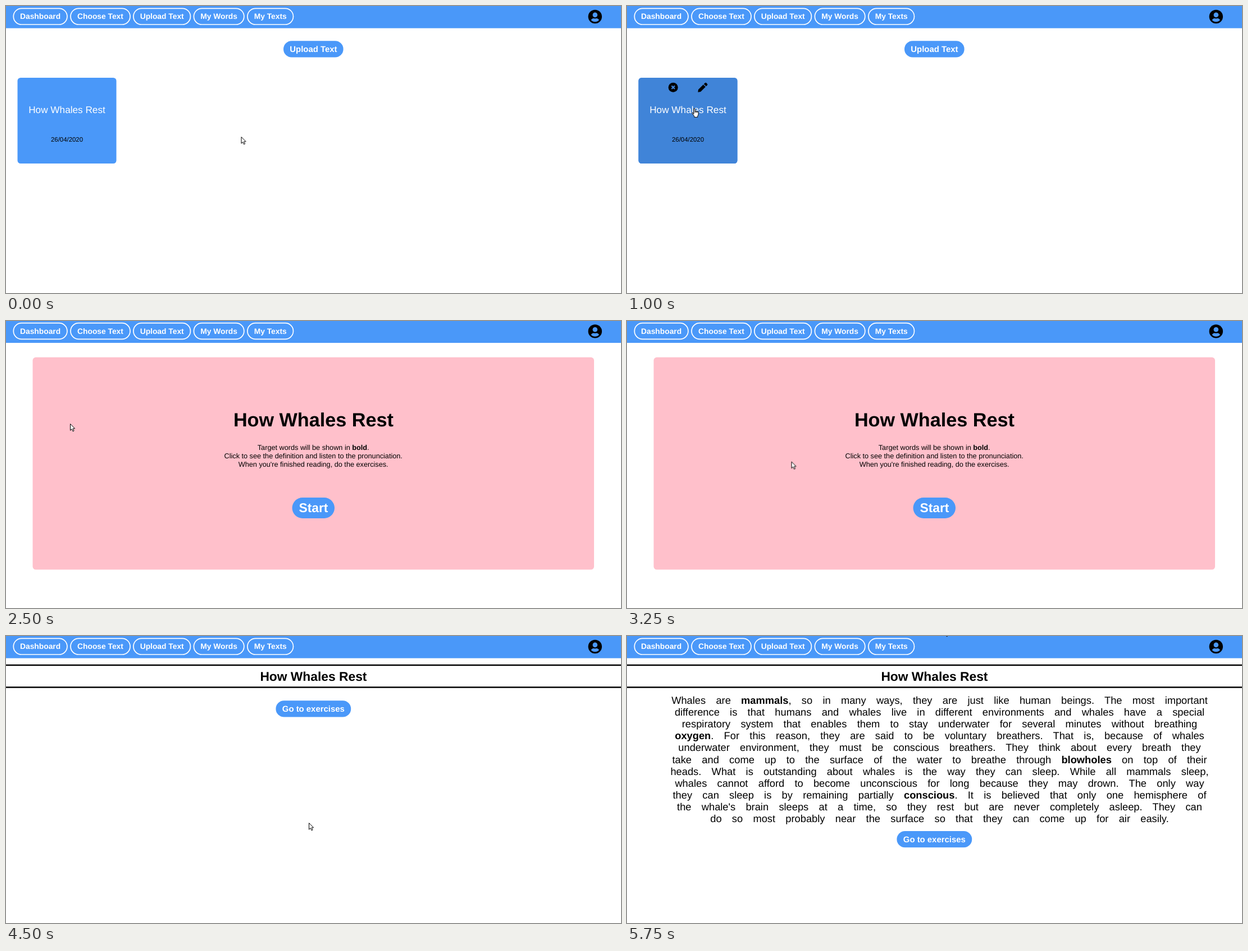
These frames come from a looping animation (1095x512 px, 6.25 s). An HTML page:

```html
<!DOCTYPE html>
<html lang="en">
<head>
<meta charset="utf-8">
<title>Reading app</title>
<style>
  html, body { margin: 0; width: 100%; height: 100%; overflow: hidden; background: #fff; }
  svg { display: block; width: 100vw; height: 100vh; --blue: #4a98f9; }
  text {
    font-family: "Liberation Sans", Arial, sans-serif;
    text-anchor: middle;
    text-rendering: geometricPrecision;
    white-space: pre;
  }
  .blue { fill: var(--blue); }
  .bold { font-weight: 700; }
  .nav text { font-size: 13.8px; font-weight: 700; fill: #fff; }
  .nav .pill { fill: none; stroke: #fff; stroke-width: 1.7; }
  .btn text { font-size: 14.9px; font-weight: 700; fill: #fff; }
  .intro { font-size: 12.7px; }
  .story text { font-size: 18.3px; word-spacing: 13.2px; }
  .pointer path { fill: #fff; stroke: #000; stroke-width: 1; stroke-linejoin: round; }

  /* one percent step of 4 equals 250 ms */
  .list, .start, .read, .card-on, .start-on, .story, .arrow, .hand, .pointer, .go, .nav {
    animation: 6250ms step-end infinite;
  }
  .list { animation-name: list; }
  .start { animation-name: start; }
  .read { animation-name: read; }
  .card-on { animation-name: card-on; }
  .start-on { animation-name: start-on; }
  .story { animation-name: story; }
  .arrow { animation-name: arrow; }
  .hand { animation-name: hand; }
  .pointer { animation-name: move; }
  .go { animation-name: go; }
  .nav { animation-name: nav; }

  @keyframes list { 0% { visibility: visible } 40%, 100% { visibility: hidden } }
  @keyframes start { 0% { visibility: hidden } 40% { visibility: visible } 72%, 100% { visibility: hidden } }
  @keyframes read { 0% { visibility: hidden } 72%, 100% { visibility: visible } }
  @keyframes card-on { 0% { visibility: hidden } 16% { visibility: visible } 40%, 100% { visibility: hidden } }
  @keyframes start-on { 0% { visibility: hidden } 60% { visibility: visible } 72%, 100% { visibility: hidden } }
  @keyframes story { 0% { visibility: hidden } 76%, 100% { visibility: visible } }
  @keyframes arrow {
    0%, 40% { visibility: visible }
    16%, 60% { visibility: hidden }
    72%, 100% { visibility: visible }
  }
  @keyframes hand {
    0%, 40% { visibility: hidden }
    16%, 60% { visibility: visible }
    72%, 100% { visibility: hidden }
  }
  @keyframes go { 0% { transform: none } 76%, 100% { transform: translateY(232.7px) } }
  @keyframes nav { 0% { transform: none } 40% { transform: translateY(-.6px) } 72%, 100% { transform: none } }
  @keyframes move {
    0% { transform: translate(418.5px, 233px) }
    4% { transform: translate(351px, 230px) }
    8% { transform: translate(263px, 215px) }
    12% { transform: translate(240px, 206.5px) }
    16% { transform: translate(115px, 182px) }
    20% { transform: translate(113.3px, 183.3px) }
    28%, 40% { transform: translate(114px, 183px) }
    48% { transform: translate(115px, 184px) }
    52% { transform: translate(292.5px, 250.5px) }
    56% { transform: translate(445.5px, 296px) }
    60%, 72% { transform: translate(539px, 333px) }
    80% { transform: translate(588px, 48px) }
    84% { transform: translate(573px, -3.5px) }
    88% { transform: translate(563.5px, -11.5px) }
    92%, 100% { transform: translate(564px, -13px) }
  }
</style>
</head>
<body>
<svg viewBox="0 0 1095 512" preserveAspectRatio="none">
  <g class="nav">
    <rect class="blue" y="-2" width="1095" height="41.6"/>
    <rect class="pill" x="13.3" y="4.3" width="95.6" height="28.7" rx="14.3"/>
    <rect class="pill" x="115" y="4.3" width="106" height="28.7" rx="14.3"/>
    <rect class="pill" x="226.9" y="4.3" width="101.5" height="28.7" rx="14.3"/>
    <rect class="pill" x="334.4" y="4.3" width="89.4" height="28.7" rx="14.3"/>
    <rect class="pill" x="429.9" y="4.3" width="81.6" height="28.7" rx="14.3"/>
    <text x="61.1" y="23.4">Dashboard</text>
    <text x="168" y="23.4">Choose Text</text>
    <text x="277.7" y="23.4">Upload Text</text>
    <text x="379.1" y="23.4">My Words</text>
    <text x="470.7" y="23.4">My Texts</text>
    <g transform="translate(1048.8 19)">
      <circle r="12.2"/>
      <circle class="blue" cy="-3.1" r="4.3"/>
      <path class="blue" d="M-7.1 6C-6.2 4.3-4.4 3.1-2.3 3.1-.8 3.6.8 3.6 2.3 3.1 4.4 3.1 6.2 4.3 7.1 6 3.8 10.4-3.8 10.4-7.1 6Z"/>
    </g>
  </g>

  <g class="list">
    <g class="btn">
      <rect class="blue" x="494" y="62.2" width="106.6" height="29.3" rx="14.6"/>
      <text x="547.4" y="82">Upload Text</text>
    </g>
    <rect class="blue" x="20.5" y="128" width="176" height="153" rx="5.5"/>
    <g class="card-on">
      <rect x="20.5" y="128" width="176" height="153" rx="5.5" fill="#4084d8"/>
      <circle cx="82.2" cy="145.2" r="8.5"/>
      <path d="M79.4 142.4l5.6 5.6m0-5.6l-5.6 5.6" stroke="#4084d8" stroke-width="2.3"/>
      <path d="M126.3 153.7l.7-4.6 8.8-8.8 4 4-8.8 8.8zM136.8 139.3l2-2q1.3-1 2.5 0l1.6 1.6q1.1 1.2 0 2.4l-2 2z"/>
    </g>
    <text x="108.5" y="191" font-size="17.2" fill="#fff">How Whales Rest</text>
    <text x="108.5" y="242" font-size="11.4">26/04/2020</text>
  </g>

  <g class="start">
    <rect x="47.5" y="64.8" width="999.5" height="378.7" rx="5.5" fill="#ffc0cb"/>
    <text class="bold" x="547.4" y="187.6" font-size="34.2">How Whales Rest</text>
    <g class="intro">
      <text x="547.2" y="229.7">Target words will be shown in <tspan class="bold">bold</tspan>.</text>
      <text x="547.2" y="244.6">Click to see the definition and listen to the pronunciation.</text>
      <text x="547.2" y="259.5">When you're finished reading, do the exercises.</text>
    </g>
    <rect class="blue" x="509.5" y="315" width="75.5" height="37" rx="18.5"/>
    <rect class="start-on" x="509.5" y="315" width="75.5" height="37" rx="18.5" fill="#3570b8"/>
    <text class="bold" x="547.4" y="341.2" font-size="22.8" fill="#fff">Start</text>
  </g>

  <g class="read">
    <path d="M0 52h1095M0 91.5h1095" stroke="#000" stroke-width="2.3"/>
    <text class="bold" x="547.4" y="79.6" font-size="22.8">How Whales Rest</text>
    <g class="btn go">
      <rect class="blue" x="480.4" y="115.3" width="133.8" height="29.3" rx="14.6"/>
      <text x="547.3" y="135">Go to exercises</text>
    </g>
    <g class="story">
      <text x="556.5" y="120.8">Whales are <tspan class="bold">mammals</tspan>, so in many ways, they are just like human beings. The most important</text>
      <text x="556.5" y="141.9">difference is that humans and whales live in different environments and whales have a special</text>
      <text x="556.5" y="163.1">respiratory system that enables them to stay underwater for several minutes without breathing</text>
      <text x="556.5" y="184.2"><tspan class="bold">oxygen</tspan>. For this reason, they are said to be voluntary breathers. That is, because of whales</text>
      <text x="556.5" y="205.4">underwater environment, they must be conscious breathers. They think about every breath they</text>
      <text x="556.5" y="226.5">take and come up to the surface of the water to breathe through <tspan class="bold">blowholes</tspan> on top of their</text>
      <text x="556.5" y="247.7">heads. What is outstanding about whales is the way they can sleep. While all mammals sleep,</text>
      <text x="556.5" y="268.8">whales cannot afford to become unconscious for long because they may drown. The only way</text>
      <text x="556.5" y="290">they can sleep is by remaining partially <tspan class="bold">conscious</tspan>. It is believed that only one hemisphere of</text>
      <text x="556.5" y="311.1">the whale's brain sleeps at a time, so they rest but are never completely asleep. They can</text>
      <text x="556.5" y="332.3">do so most probably near the surface so that they can come up for air easily.</text>
    </g>
  </g>

  <g class="pointer">
    <path class="arrow" d="M.5.6V12.2L3.2 9.6 5 13.8 7 13 5.2 8.9H8.6Z"/>
    <g class="hand">
      <path d="M3.8 11V1.8a1.1 1.1 0 0 1 2.2 0V5.6q1.1-.9 2.1.3 1.2-.7 2 .4 2-.3 2 1.5V11q-.3 2-1.4 3.4V16.3H4.8V14.6Q3 12 .9 9.6.3 8 1.8 8.2 3 8.8 3.8 11Z"/>
      <path d="M6 5.6V8.4M8.1 5.9V8.4M10.1 6.3V8.4" stroke-width=".8"/>
    </g>
  </g>
</svg>
</body>
</html>
```
